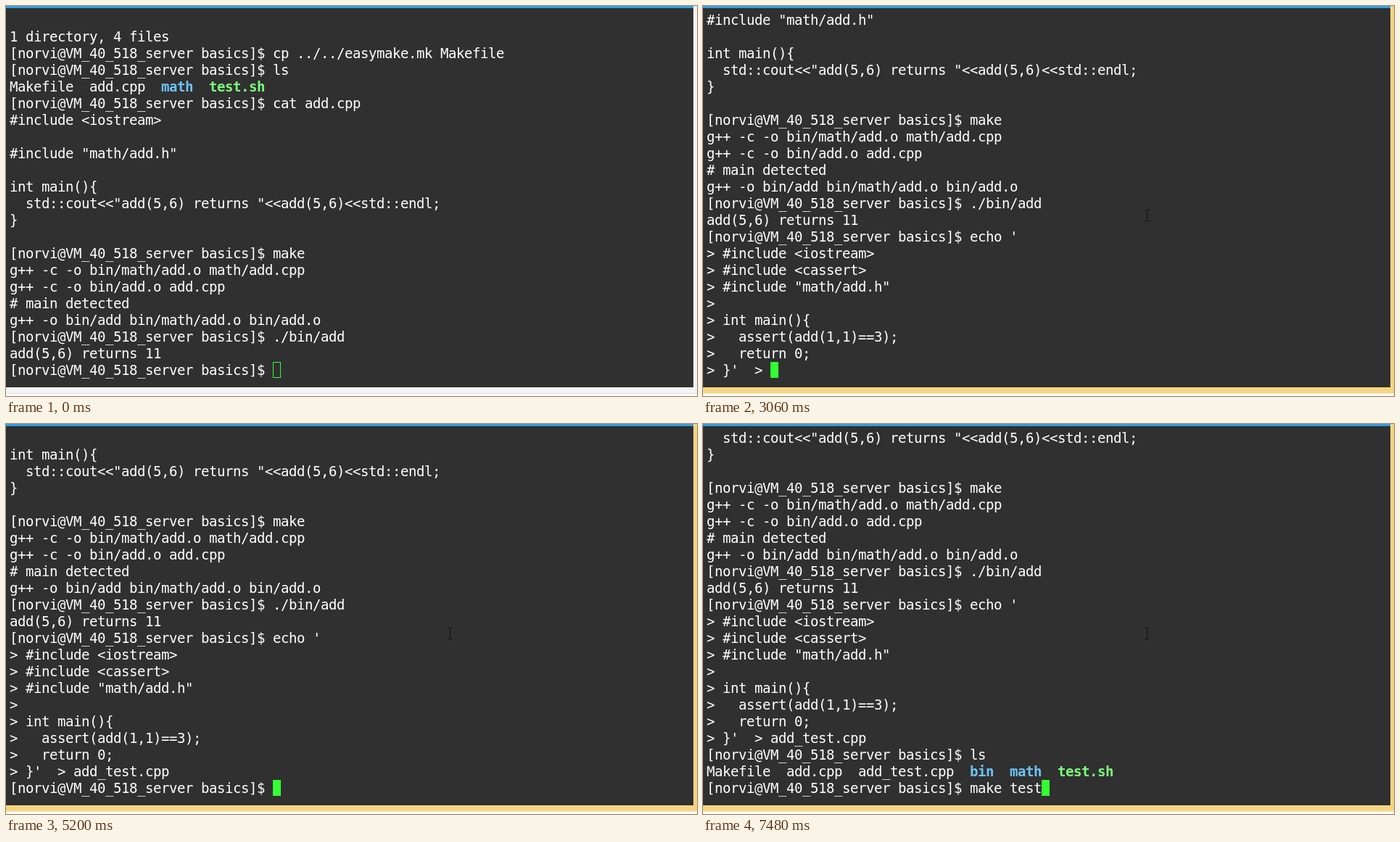
Animation of 953x538 px, one loop 8 s. Source, as an HTML page:

```html
<!DOCTYPE html>
<html lang="en">
<head>
<meta charset="utf-8">
<title>Terminal session</title>
<style>
  html, body { margin: 0; width: 100%; height: 100%; overflow: hidden; background: #fff; }
  #stage { position: relative; width: 953px; height: 538px; overflow: hidden; background: #fcfcfc; }
  #stage div, #stage svg { position: absolute; }
  #frame { left: 0; top: 0; width: 953px; height: 534px; background: #f3f3f3; border-bottom: 1px solid #e2e2e2; }
  #frame.focus { background: #f5d580; border-color: #f3e6c3; }
  #term { left: 0; top: 0; width: 948px; height: 526px; background: #303030; }
  #bar { left: 0; top: 0; width: 948px; height: 3px; background: #2f9fe6; }
  #view { left: 5px; top: 8px; width: 943px; height: 515px; overflow: hidden; }
  #screen { left: 0; top: 0; width: 943px; height: 515px; }
  #screen text {
    white-space: pre; fill: #fff;
    font: 19px "DejaVu Sans Mono", monospace;
    letter-spacing: calc(11px - 1ch); font-variant-ligatures: none;
  }
  #screen tspan { font-weight: bold; }
  #screen .dir { fill: #6cc4f8; }
  #screen .exe { fill: #7dff7d; }
  #cursor { box-sizing: border-box; width: 11px; height: 22px; border: 1px solid #33ff33; }
  .focus #cursor { background: #33ff33; }
  #stage .beam { left: 0; top: 0; width: 7px; height: 16px; fill: none; }
</style>
</head>
<body>
<div id="stage">
  <div id="frame">
    <div id="term"></div>
    <div id="bar"></div>
    <div id="view">
      <svg id="screen"><g id="lines"></g></svg>
      <div id="cursor"></div>
    </div>
  </div>
  <svg id="trail" class="beam" stroke="#292929"><path d="M0 .5H3M4 .5H7M3.5 1V15M0 15.5H3M4 15.5H7"/></svg>
  <svg id="mouse" class="beam" stroke="#101010"><path d="M0 .5H3M4 .5H7M3.5 1V15M0 15.5H3M4 15.5H7"/></svg>
</div>
<script>
const LOOP = 8000, ROWS = 22, CELL_W = 11, CELL_H = 23, BASELINE = 18;
const PROMPT = '[norvi@VM_40_518_server basics]$ ';
const $ = id => document.getElementById(id);

// "$ " at the start of a line stands for the prompt; *name* is a folder, !name! a script.
const session = `
1 directory, 4 files
$ cp ../../easymake.mk Makefile
$ ls
Makefile  add.cpp  *math*  !test.sh!
$ cat add.cpp
#include <iostream>

#include "math/add.h"

int main(){
  std::cout<<"add(5,6) returns "<<add(5,6)<<std::endl;
}

$ make
g++ -c -o bin/math/add.o math/add.cpp
g++ -c -o bin/add.o add.cpp
# main detected
g++ -o bin/add bin/math/add.o bin/add.o
$ ./bin/add
add(5,6) returns 11
$ echo '
> #include <iostream>
> #include <cassert>
> #include "math/add.h"
>
> int main(){
>   assert(add(1,1)==3);
>   return 0;
> }'  > add_test.cpp
$ ls
Makefile  add.cpp  add_test.cpp  *bin*  *math*  !test.sh!
$ make test`.split('\n').map(s => s.replace(/^\$ /, PROMPT));

// [time, active line, characters typed on it]
const P = PROMPT.length;
const typing = [
  [0, 21, P],
  [1710, 29, 5], [2500, 29, 6], [2790, 29, 7], [3060, 29, 8], [3220, 29, 9],
  [3360, 29, 10], [3540, 29, 11], [3880, 29, 12], [4030, 29, 13], [4200, 29, 14],
  [4270, 29, 16], [4580, 29, 17], [4660, 29, 18], [4820, 29, 19], [4970, 29, 20],
  [5200, 30, P], [6170, 30, P + 2], [6330, 31, 0], [6410, 32, P],
  [6570, 32, P + 1], [6640, 32, P + 2], [6790, 32, P + 3], [6860, 32, P + 4],
  [7040, 32, P + 5], [7370, 32, P + 6], [7430, 32, P + 8], [7480, 32, P + 9]
];

// [time, x, y] of the pointer
const pointer = [[0, -20, 0], [70, 657, 340], [270, 634, 311], [330, 609, 281]];
const FOCUS = 570;

const escapeHtml = s => s.replace(/&/g, '&amp;').replace(/</g, '&lt;').replace(/>/g, '&gt;');
const markup = s => escapeHtml(s)
  .replace(/\*(\w+)\*/g, '<tspan class="dir">$1</tspan>')
  .replace(/!([\w.]+)!/g, '<tspan class="exe">$1</tspan>');
const place = (el, x, y) => { el.style.transform = `translate(${x}px,${y}px)`; };
const stepAt = (table, t) => table.filter(s => s[0] <= t).pop();

const rows = session.map((text, i) => {
  const row = document.createElementNS('http://www.w3.org/2000/svg', 'text');
  row.setAttribute('y', i * CELL_H + BASELINE);
  $('lines').append(row);
  return row;
});
place($('trail'), 746, 437);

let shown = null;
function drawText(step) {
  if (step === shown) return;
  shown = step;
  const [, last, count] = step;
  rows.forEach((row, i) => {
    row.style.display = i > last || i <= last - ROWS ? 'none' : '';
    row.innerHTML = i === last ? escapeHtml(session[i].slice(0, count)) : markup(session[i]);
  });
  place($('lines'), 0, (ROWS - 1 - last) * CELL_H);
  place($('cursor'), count * CELL_W, (ROWS - 1) * CELL_H);
}

function draw(t) {
  drawText(stepAt(typing, t));
  const [, x, y] = stepAt(pointer, t);
  place($('mouse'), x, y);
  $('frame').classList.toggle('focus', t >= FOCUS);
  $('trail').style.display = t < FOCUS ? '' : 'none';
}

const start = performance.now();
function tick() {
  draw((performance.now() - start) % LOOP);
  requestAnimationFrame(tick);
}
tick();
</script>
</body>
</html>
```
